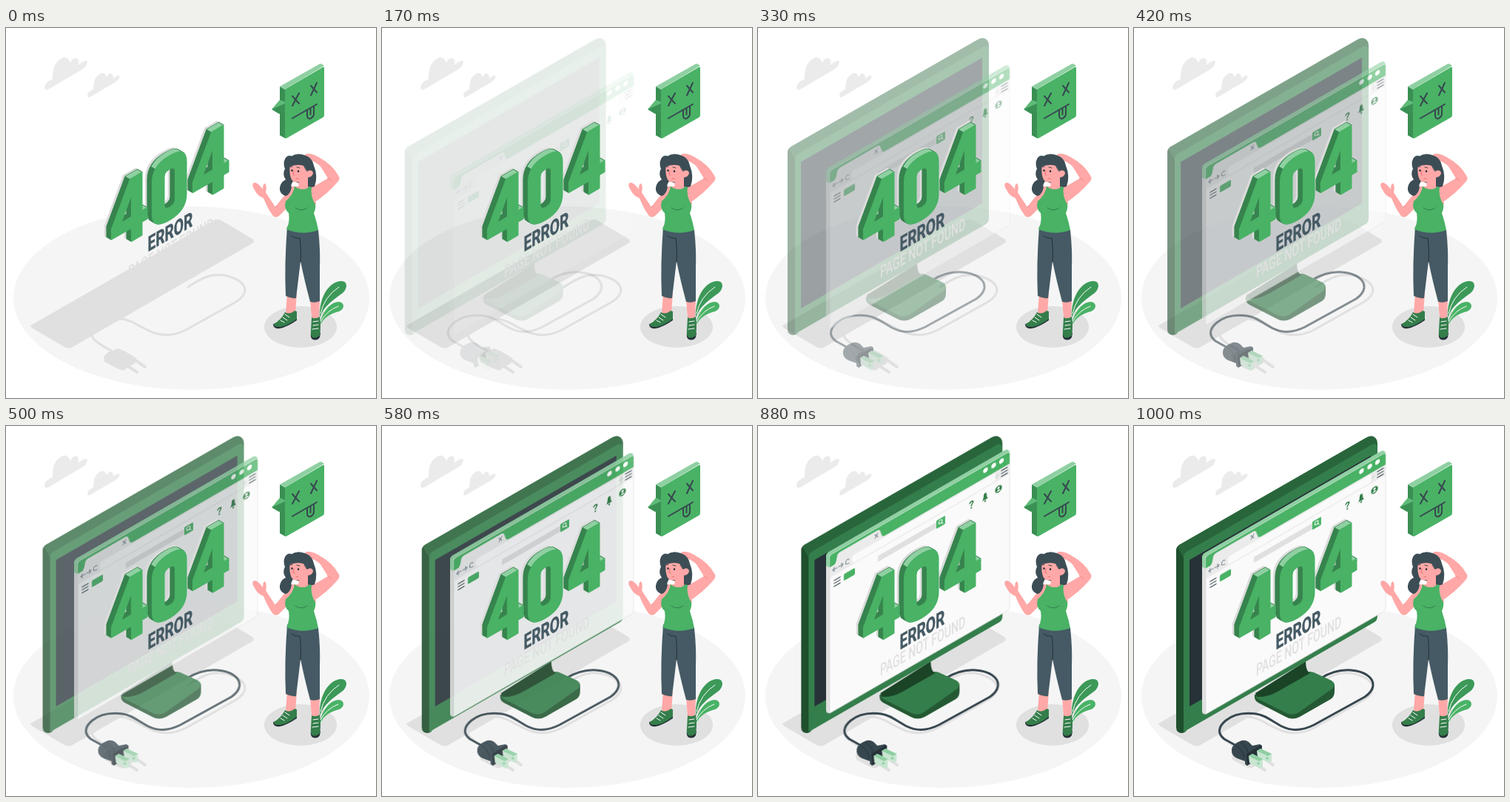
An HTML page for the animation above (1040 ms loop, 500 px wide and 500 px high).

```html
<!DOCTYPE html>
<html lang="en">
<head>
<meta charset="utf-8">
<title>404 error</title>
<style>
html, body { margin: 0; width: 100%; height: 100%; overflow: hidden; background: #fff; }
svg { display: block; width: 100vw; height: 100vh; }
text { font-family: Roboto, "Liberation Sans", sans-serif; }
.line { fill: none; stroke-linecap: round; stroke-linejoin: round; }
#monitor, #page { opacity: 0; }
</style>
</head>
<body>
<svg viewBox="0 0 500 500">
  <defs>
    <path id="cloud" d="M52 80Q53 73 63 69Q62 48 75 41Q83 37 87 47Q91 38 97 42Q99 46 98 50Q107 42 110 45Q110 52 101 57L57 83Q52 85 52 80Z"/>
    <path id="four" fill-rule="evenodd" d="M25 0H41V52H48V67H41V85H27V67H0V53ZM27 52V22L13 52Z"/>
    <g id="digits" stroke-width="1.6" stroke-linejoin="round">
      <use href="#four"/>
      <path fill-rule="evenodd" d="M55 21Q55 -1 78 -1T101 21V64Q101 86 78 86T55 64ZM71 24Q71 17 78.5 17T86 24V62Q86 69 78.5 69T71 62Z"/>
      <use href="#four" x="110"/>
    </g>
  </defs>

  <!-- ground and shadows -->
  <ellipse cx="250.5" cy="365" rx="240.5" ry="124" fill="#f5f5f5"/>
  <g fill="#ebebeb">
    <use href="#cloud"/>
    <use href="#cloud" transform="translate(71 31) scale(.75)"/>
  </g>
  <g fill="#e0e0e0" stroke="#e0e0e0">
    <path stroke="none" d="M35 401L279 261Q285 257 291 260L333 285Q337 288 333 291L90 431Q85 434 79 431L36 406Q31 403 35 401Z"/>
    <path class="line" stroke-width="3" d="M246 350Q262 339 275 335C300 330 322 342 323 354Q323 362 311 370L243 408Q222 419 200 412Q188 407 172 398Q152 388 133 398Q114 408 117 418Q120 424 142 436"/>
    <path stroke="none" d="M132 444L138 438L152 433L161 437L176 446L174 453L158 463L150 460L133 451Z"/>
    <path class="line" stroke-linecap="butt" stroke-width="4" d="M163 456L177 465M172 447L188 458"/>
  </g>

  <g id="monitor">
    <path class="line" stroke="#37474f" stroke-width="3" d="M252 341C265 333 280 329 293 330C311 331 324 340 323 351Q322 359 312 366L243 404C225 413 212 412 200 406C185 398 178 391 165 389C150 387 135 389 124 398C113 407 113 416 122 423L140 433"/>
    <path fill="#245934" d="M163 363Q162 371 168 374L205 393Q214 398 224 393L266 369Q271 366 271 358V349Z"/>
    <path fill="#347e4b" d="M166 361L232 333Q238 331 243 333L267 344Q274 349 268 355L224 386Q214 393 204 387L168 369Q162 365 166 361Z"/>
    <path fill="#1b4427" d="M164 361L232 318Q232 331 238 334L194 359Q180 367 166 366Z"/>
    <path fill="#1f4f2d" d="M57 168Q57 163 62 160L70 170V413Q64 417 59 413Q57 411 57 407Z"/>
    <path fill="#29653b" d="M59 164Q60 162 62 160L315 15Q321 12 325 15Q329 18 329 24V36L67 178Z"/>
    <path fill="#347e4b" d="M67 177Q67 173 71 170L320 26Q329 21 329 30V257Q329 262 325 265L73 410Q69 413 67 414Z"/>
    <path fill="#263238" d="M75 181L320 40V237L75 379Z"/>
    <!-- plug -->
    <path fill="#37474f" d="M132 437Q133 430 143 426Q149 423 155 427L160 432L170 430L173 432V445L153 459L150 457V453L139 449Q131 445 132 437Z"/>
    <path fill="#263238" d="M152 443L172 431L173 445L153 459Z"/>
    <path class="line" stroke="#263238" d="M138 432Q147 437 149 449M144 428Q153 433 154 441"/>
    <g fill="#c8e6d1">
      <path d="M155 446L160 443L174 450V461L170 463L156 455Z"/>
      <path d="M166 439L171 436L186 443V453L182 455L167 447Z"/>
    </g>
    <g fill="#8fcfa3">
      <path d="M155 446L160 443L174 450L169 453Z"/>
      <path d="M166 439L171 436L186 443L181 446Z"/>
      <circle cx="168" cy="456" r="1.8"/><circle cx="180" cy="449" r="1.8"/>
    </g>
  </g>

  <g id="page">
    <g transform="matrix(1 -.577 0 1 97 176.5)">
      <path fill="#e0e0e0" d="M-5 -4L0 0V213L-3 211Q-5 209 -5 206Z"/>
      <path fill="#8fd0a2" d="M-5 -2Q-5 -5 -2 -6H236Q241 -6 243 0V4H0V16L-5 11Z"/>
      <path fill="#fafafa" stroke="#e0e0e0" stroke-width=".8" d="M0 0H243V209Q243 213 239 213H0Z"/>
      <path fill="#49b265" d="M0 16V3Q0 0 3 0H240Q243 0 243 3V16Z"/>
      <path fill="#ebebeb" d="M0 16H5Q8 16 9 11L10 6Q11 3 14 3H64Q67 3 68 6L70 12Q71 16 75 16H243V30H0Z"/>
      <rect x="30" y="17.500" width="194" height="11" rx="3" fill="#fafafa"/>
      <g fill="#fff"><circle cx="210.500" cy="6" r="3.200"/><circle cx="221.500" cy="6" r="3.200"/><circle cx="232" cy="6" r="3.200"/></g>
      <g class="line" stroke="#78878f" stroke-width="1.1">
        <path d="M61 7L65 12M65 7L61 12M10 22H4M6.500 19.500L4 22L6.500 24.500M12 22H18M15.500 19.500L18 22L15.500 24.500M26 20Q23 17 21.500 21T26 25"/>
        <path stroke="#546067" stroke-width="1.4" d="M232 19H240M232 23H240M232 27H240M6 37H14M6 41H14M6 45H14"/>
        <path stroke="#d5d5d5" d="M226 20V26M223.500 23H228.500"/>
      </g>
      <rect x="65" y="38" width="79" height="8" fill="#e0e0e0"/>
      <g fill="#49b265">
        <rect x="19" y="36" width="15" height="9" rx="1.5"/>
        <rect x="144" y="36" width="12" height="11" rx="1"/>
      </g>
      <g class="line" stroke="#fff"><circle cx="149.500" cy="40.500" r="2.300"/><path d="M151 42.500L153 44.500"/></g>
      <g fill="#347e4b">
        <text x="188" y="46.500" font-size="14" font-weight="700">?</text>
        <path d="M206 45.500Q208 43.500 208 39.500Q208 36.500 210 36.500Q212 36.500 212 39.500Q212 43.500 214 45.500ZM209 46.500H211V48.500H209Z"/>
        <circle cx="228" cy="41.500" r="4.700"/>
      </g>
      <g fill="#fff"><circle cx="228" cy="40" r="1.600"/><path d="M225 44.500Q228 40 231 44.500Z"/></g>
    </g>
  </g>

  <!-- message -->
  <g id="number" transform="matrix(1 -.577 0 1 142.700 218.700)"></g>
  <text transform="matrix(.685 -.395 0 1 191.500 302.500)" font-size="28" font-weight="700" fill="#455a64" stroke="#455a64" stroke-width=".5">ERROR</text>
  <text transform="matrix(.63 -.3635 0 1 165 338)" font-size="22.500" font-weight="500" fill="#e0e0e0">PAGE NOT FOUND</text>

  <!-- speech block -->
  <path fill="#3a8f52" d="M370 79L377 83V149L370 145Z"/>
  <path fill="#8fd0a2" d="M370 79L423 49Q426 47 430 51L377 83Z"/>
  <path fill="#5dbb77" d="M359 110L370 97L377 100V108Z"/>
  <path fill="#3a9154" d="M359 110L377 102V113L369 116Z"/>
  <path fill="#49b265" d="M377 83L428 53Q430 52 430 54V117Q430 120 428 121L379 149Q377 150 377 148Z"/>
  <g class="line" stroke="#37474f" stroke-width="2">
    <path d="M387 92L396 102M396 88L387 105M412 78L420 87M420 74L412 91M387 122L420 103M407 111V119Q408 124 412 122Q416 120 416 115V106M411.500 109V117"/>
  </g>

  <!-- woman and plant -->
  <ellipse cx="398" cy="404" rx="49" ry="28" fill="#e0e0e0"/>
  <path fill="#3c9958" d="M424 391C423 365 435 344 452 342C462 341 462 352 455 358C440 369 430 376 424 391Z"/>
  <path fill="#49b265" d="M424 402C426 385 438 370 450 370C458 371 458 380 450 383C438 386 430 391 424 402Z"/>
  <path class="line" stroke="#fff" d="M425 386Q430 363 450 350M425 397Q433 382 449 376"/>
  <g fill="#ffa8a7">
    <path d="M380 358H393L391 386Q384 390 378 385Z"/>
    <path d="M411 366H424L423 393Q418 396 413 392Z"/>
    <path d="M384 217Q372 231 364 242Q356 230 351 222Q353 213 350 210Q347 210 347 218Q340 208 335 209Q331 212 336 219Q340 227 348 230Q354 245 361 254Q366 258 371 252Q380 243 386 236Z"/>
    <path d="M412 216Q424 210 435 203L425 187Q418 180 408 178Q402 174 404 171Q411 167 425 176Q440 184 449 199Q452 203 449 207Q436 223 415 237Z"/>
    <path d="M386 214H415L419 238H379Z"/>
  </g>
  <path class="line" stroke="#e88b8a" d="M435 203L440 206M364 242L367 240"/>
  <path fill="#3c4d55" d="M377 177Q380 171 386 173Q394 168 404 172Q414 175 416 186Q422 200 417 214Q410 217 406 213L388 207Q384 213 386 215Q384 225 378 227Q367 223 371 212Q373 207 378 205Q373 198 377 190Q374 183 377 177Z"/>
  <path fill="#ffa8a7" d="M384 184Q382 197 386 205Q390 210 396 208L395 216Q402 222 408 215V202Q415 201 415 195Q412 190 407 194L404 187Q394 181 384 184Z"/>
  <path fill="#3c4d55" d="M382 184Q390 177 402 184Q406 189 406 194L402 186Q392 183 382 188Z"/>
  <g class="line" stroke="#37474f"><path d="M384.500 188L387 187M393 188L397 189"/><path stroke="#e06f70" d="M389 193L388 198L390 198.500M392 204Q394 202 395 204"/></g>
  <g fill="#263238"><ellipse cx="386.500" cy="192.500" rx="1.200" ry="1.600"/><ellipse cx="395" cy="193.500" rx="1.200" ry="1.600"/></g>
  <path fill="#455a64" d="M380 268L422 273Q425 300 424 325V369Q418 372 411 370Q403 340 398 315Q395 340 392 365Q385 366 378 362Q376 320 380 268Z"/>
  <path class="line" stroke="#263238" d="M386 281Q391 285 397 284Q399 297 398 316"/>
  <path fill="#49b265" d="M390 214Q388 226 378 234Q375 244 382 250Q384 262 379 272Q400 281 422 273Q420 262 416 250Q419 243 418 238Q411 228 413 215L410 214Q405 220 395 217Z"/>
  <path class="line" stroke="#347e4b" d="M391 243Q399 249 407 243"/>
  <path fill="#263238" d="M361 400L393 392V395Q380 404 370 406Q361 407 361 400ZM412 412H425L424 418Q421 423 415 421Q411 420 412 412Z"/>
  <g fill="#347e4b">
    <path d="M377 384Q383 388 390 382L393 383V393Q380 403 370 404Q361 404 362 400Q372 394 377 384Z"/>
    <path d="M413 391Q418 394 424 390Q426 405 424 415Q420 420 414 418Q411 415 412 409Z"/>
  </g>
  <path class="line" stroke="#fff" d="M377 387L383 391M374 391L380 395M371 395L376 398M415 397L422 396M415 402L422 401M414 407L422 406"/>
</svg>
<script>
const LOOP = 1040, TRAVEL = 30;

// [time in ms, progress]; progress overshoots, then settles
const STEPS = [
  [80, .05], [170, .12], [250, .23], [330, .43], [420, .6], [500, .75],
  [580, .89], [660, 1], [750, 1.06], [840, 1.06], [920, 1.03], [1000, 1], [LOOP, 1]
];

function drawNumber() {
  const root = document.getElementById("number");
  const ns = "http://www.w3.org/2000/svg";
  const add = (tag, attrs) => {
    const el = document.createElementNS(ns, tag);
    for (const key in attrs) el.setAttribute(key, attrs[key]);
    root.append(el);
  };
  const layer = (depth, color) => add("use", {
    href: "#digits", fill: color, stroke: color,
    transform: `translate(${-6.5 * depth} ${-7.5 * depth})`
  });
  for (let k = 14; k > 10; k--) layer(k / 10, "#dcdcdc");
  for (let k = 10; k > 0; k--) layer(k / 10, "#37844e");
  add("path", {
    fill: "#8fd0a2",
    d: "M25 0H41L34.5 -7.5H18.5ZM41 52H48L41 44ZM135 0H151L144.5 -7.5H128.5ZM151 52H158L151 44Z" +
       "M60 7Q66 -1 78 -1Q92 -1 97 6L90 -2Q85 -8.500 71.500 -8.500Q59 -8.500 53.500 -.5Z"
  });
  layer(0, "#49b265");
}

function play(id, axis, from) {
  const frame = (time, p, opacity = Math.min(p, 1)) => ({
    offset: time / LOOP, opacity,
    transform: `translate${axis}(${from * (1 - p)}px)`
  });
  const frames = [
    frame(0, 0),
    frame(STEPS[0][0], 0),
    ...STEPS.map(([time, p]) => frame(time, p))
  ];
  const run = document.getElementById(id).animate(frames, { duration: LOOP, iterations: Infinity });
  run.startTime = document.timeline.currentTime;
}

drawNumber();
play("monitor", "X", -TRAVEL);
play("page", "Y", TRAVEL);
</script>
</body>
</html>
```
